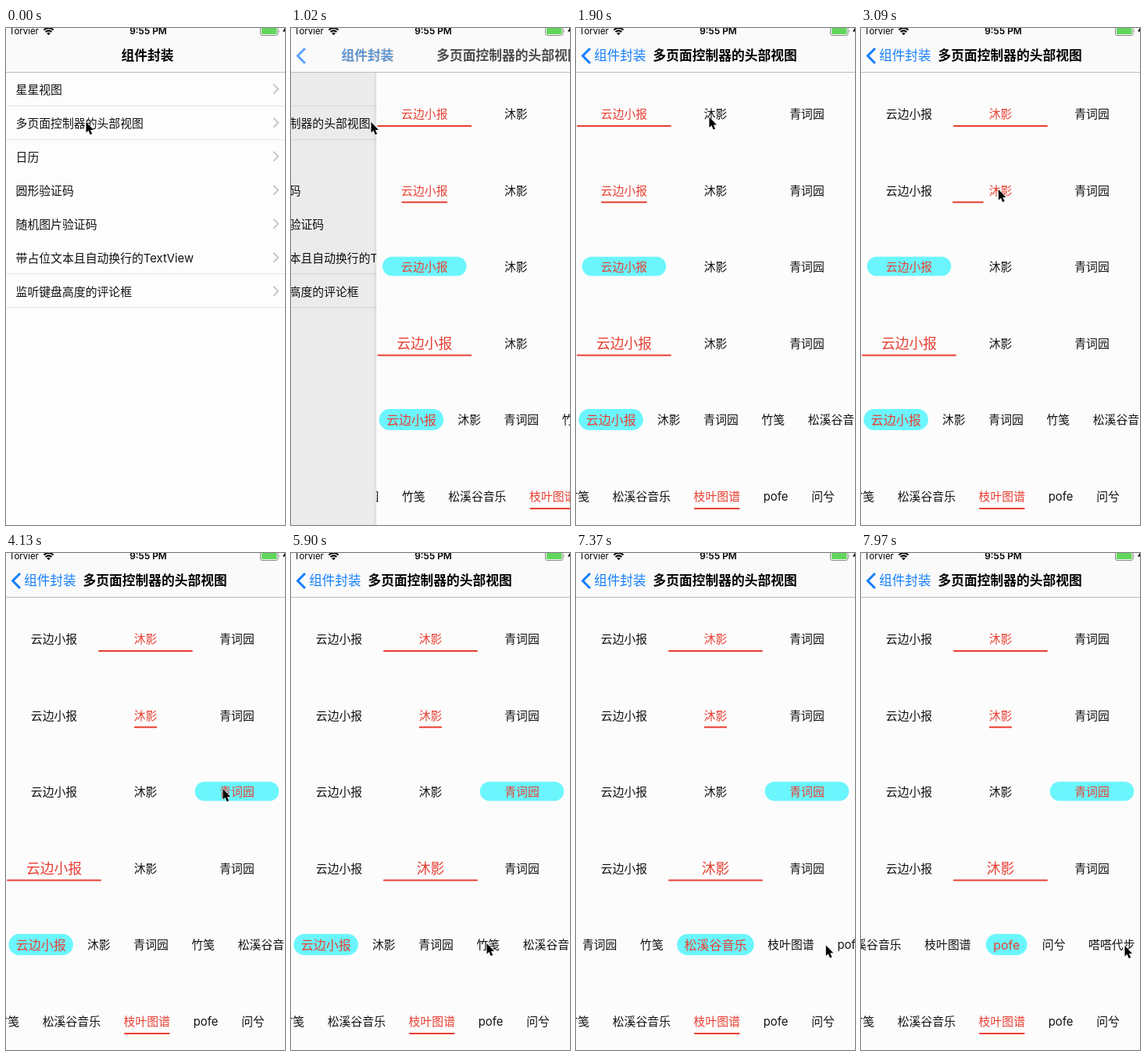
These frames come from a looping animation (357 by 634 pixels, 8000 ms). An HTML page:

```html
<!DOCTYPE html>
<html lang="zh-CN">
<head>
<meta charset="utf-8">
<title>组件封装</title>
<style>
html, body { margin: 0; width: 100%; height: 100%; overflow: hidden; background: #fdfdfd; }
svg { display: block; width: 100vw; height: 100vh; }
text { font: 14.85px Inter, "Noto Sans CJK SC", "Noto Sans CJK", sans-serif; fill: #111; white-space: pre; }
.mid { text-anchor: middle; }
.head { font-size: 16.75px; font-weight: 600; fill: #000; }
.back { font-size: 16.6px; fill: #147efb; }
.status { font-size: 11.4px; fill: #000; }
.clock { font-size: 11.9px; font-weight: 600; }
.on { fill: #e93f33; }
.bar { fill: #e93f33; }
.pill { fill: #6af6fc; }
.thin { fill: none; stroke: #c7c7cc; stroke-width: 2; }
.rule { stroke: #e6e6e8; }
</style>
</head>
<body>
<svg id="stage" viewBox="0 0 357 634">
  <defs>
    <linearGradient id="edge">
      <stop offset="0" stop-opacity="0"/>
      <stop offset="1" stop-opacity=".06"/>
    </linearGradient>
    <clipPath id="frame"><rect width="357" height="634"/></clipPath>
  </defs>
  <rect width="357" height="634" fill="#fdfdfd"/>
  <g id="list"></g>
  <rect id="dim" y="57" width="357" height="577"/>
  <g id="page">
    <rect x="-5" y="57" width="5" height="577" fill="url(#edge)"/>
    <rect y="57" width="357" height="577" fill="#fcfcfc"/>
  </g>
  <rect width="357" height="56" fill="#fafafa"/>
  <path d="M0 56.5H357" stroke="#bdbdbf"/>
  <path id="chevron" d="M18 26L8.6 35.5L18 45" fill="none" stroke="#147efb" stroke-width="3"/>
  <text id="oldTitle" class="head" y="41.2">组件封装</text>
  <text id="backTitle" class="back" y="41.2">组件封装</text>
  <text id="newTitle" class="head" y="41.2">多页面控制器的头部视图</text>
  <text class="status" x="4" y="8">Torvier</text>
  <g fill="none" stroke="#000" stroke-width="2">
    <path d="M48.4 2.6Q54.5 -2.8 60.6 2.6"/>
    <path d="M50.6 5.1Q54.5 1.7 58.4 5.1"/>
  </g>
  <path d="M52.2 6.6Q54.5 4.8 56.8 6.6L54.5 9.2Z"/>
  <text class="status clock mid" x="182" y="8.3">9:55 PM</text>
  <rect x="325.5" y="-1.5" width="22.5" height="11" rx="2.5" fill="none" stroke="#8a8a8a"/>
  <rect x="327" y="0" width="19.5" height="8" rx="1" fill="#62d65c"/>
  <path d="M349.3 2.2Q351 4 349.3 5.8Z" fill="#8a8a8a"/>
  <path d="M357.5 -1L354 4.6H357V9H358V-1Z"/>
  <path id="mouse" d="M0 0V13.6L3 10.8L5.2 16L7.7 15L5.4 9.9H9.5Z" stroke="#fff" stroke-width="1" paint-order="stroke"/>
</svg>
<script>
const LOOP = 8000, MID = 178.5, EM = 14.85;
const $ = id => document.getElementById(id);
const list = $('list'), page = $('page');

function add(parent, tag, attrs, label) {
  const el = document.createElementNS('http://www.w3.org/2000/svg', tag);
  set(el, attrs);
  if (label) el.textContent = label;
  parent.append(el);
  return el;
}
function set(el, attrs) {
  for (const k in attrs) el.setAttribute(k, attrs[k]);
}
const move = (el, x, y = 0, s = 1) => set(el, { transform: `translate(${x} ${y}) scale(${s})` });
const mix = (a, b, p) => a + (b - a) * p;
const part = (t, start, len) => Math.min(1, Math.max(0, (t - start) / len));
const ease = (t, start, len = 300) => {
  const u = part(t, start, len);
  return u * u * (3 - 2 * u);
};

// First screen
['星星视图', '多页面控制器的头部视图', '日历', '圆形验证码', '随机图片验证码',
  '带占位文本且自动换行的TextView', '监听键盘高度的评论框'].forEach((name, i) => {
  const y = 78 + 43 * i;
  add(list, 'text', { x: 12.6, y: y + 5.6 }, name);
  add(list, 'path', { class: 'thin', d: `M342.3 ${y - 6.3}l6 6l-6 6` });
});
for (const y of [99.5, 142.5, 313.5, 356.5]) add(list, 'path', { class: 'rule', d: `M0 ${y}H357` });

// Second screen
const names = ['云边小报', '沐影', '青词园', '竹笺', '松溪谷音乐', '枝叶图谱', 'pofe', '问兮', '嗒嗒代步'];
const cols = [61.5, MID, 295.5];
const widths = names.map(n => n === 'pofe' ? 32 : n.length * EM);
let edge = 15;
const centers = widths.map(w => {
  const c = edge + w / 2;
  edge += w + 29.6;
  return c;
});

function label(parent, name) {
  const g = add(parent, 'g', {});
  const text = add(g, 'text', { class: 'mid', y: 5.6 }, name);
  return { g, text };
}
const paint = (item, on) => item.text.classList.toggle('on', on);

// Three-column rows: y, marker height and widths, click time, chosen column, scale
const tabs = [
  { y: 109, mark: 125, h: 2, w: [121, 121], at: 1990, to: 1, big: 1 },
  { y: 207, mark: 222.2, h: 2, w: [59, 29.5], at: 2900, to: 1, big: 1 },
  { y: 304, mark: 304, h: 24.5, w: [107.5, 107.5], at: 3800, to: 2, big: 1 },
  { y: 402, mark: 417.5, h: 2, w: [121, 121], at: 4980, to: 1, big: 1.2 }
];
for (const r of tabs) {
  r.el = add(page, 'rect', { class: r.h > 9 ? 'pill' : 'bar', y: r.mark - r.h / 2, height: r.h, rx: r.h / 2 });
  r.items = cols.map((_, i) => label(page, names[i]));
}
function drawTab(r, t) {
  const p = ease(t, r.at), clicked = t >= r.at;
  const w = mix(r.w[0], r.w[1], p);
  set(r.el, { x: mix(cols[0], cols[r.to], p) - w / 2, width: w });
  r.items.forEach((item, i) => {
    const on = i === (clicked ? r.to : 0);
    paint(item, on);
    move(item.g, cols[i], r.y, on ? (clicked ? mix(1, r.big, p) : r.big) : 1);
  });
}

// Scrolling row with a pill behind the chosen label
const scroller = add(page, 'g', { 'clip-path': 'url(#frame)' });
const strip = add(scroller, 'g', {});
const stripItems = names.map(n => label(strip, n));
stripItems.forEach((item, i) => {
  const w = widths[i] + 17;
  item.pill = add(item.g, 'rect', { class: 'pill', x: -w / 2, y: -12.5, width: w, height: 25, rx: 12.5 });
  item.g.prepend(item.pill);
});
const clicks = [[6150, 3], [6773, 4], [7700, 6]];
function drawStrip(t) {
  let chosen = 0, scroll = 0, grow = 1;
  for (const [at, i] of clicks) {
    if (t < at) break;
    chosen = i;
    grow = ease(t, at);
    scroll = mix(scroll, centers[i] - MID, grow);
  }
  move(strip, -scroll);
  stripItems.forEach((item, i) => {
    const on = i === chosen;
    paint(item, on);
    set(item.pill, { visibility: on ? 'visible' : 'hidden' });
    move(item.g, centers[i], 499.5, on ? 1 + 0.08 * grow : 1);
  });
}

// Bottom row, scrolls once while the screen slides in
const foot = add(scroller, 'g', {});
names.forEach((n, i) => {
  const item = label(foot, n);
  paint(item, i === 5);
  move(item.g, centers[i], 597);
});
add(foot, 'rect', { class: 'bar', x: centers[5] - 29.3, y: 611.9, width: 58.6, height: 2, rx: 1 });

// Pointer stops: time, x, y
const stops = [[0, 102.5, 120], [1310, 102.5, 120], [1890, 170.5, 113.5], [2345, 170.5, 113.5],
  [2620, 176, 206], [3090, 176, 206], [3370, 268, 294], [3680, 268, 294], [3815, 277.5, 301],
  [4430, 277.5, 301], [4850, 180, 400], [5310, 180, 400], [5590, 222, 472], [5885, 250.5, 498],
  [6340, 250.5, 498], [6480, 266.5, 498.5], [7080, 266.5, 498.5], [7510, 337.5, 501], [LOOP, 337.5, 501]];
function drawMouse(t) {
  const i = stops.findIndex(s => s[0] > t);
  const a = stops[i - 1], b = stops[i];
  const p = ease(t, a[0], b[0] - a[0]);
  move($('mouse'), mix(a[1], b[1], p), mix(a[2], b[2], p));
}

function drawPush(t) {
  const left = (1 - part(t, 861, 450)) ** 3, p = 1 - left;
  const x = 24 + 124 * left ** 0.93;
  move(list, -107 * p);
  move(page, 363 * left - 6 * left * p ** 0.5);
  move(foot, -250 * ease(t, 793, 295));
  set($('dim'), { opacity: 0.1 * p });
  set($('oldTitle'), { x: x - 0.4, opacity: left });
  set($('backTitle'), { x: x - 0.8, opacity: p });
  set($('newTitle'), { x: 98.6 + 287 * left, opacity: p });
  set($('chevron'), { opacity: p });
}

// The screen refreshes in even ticks
const FIRST = 1008, TICK = 147.95;
const hold = t => t < FIRST ? 0 : FIRST + Math.floor((t - FIRST) / TICK) * TICK;

function draw(now) {
  const t = hold(now % LOOP);
  drawPush(t);
  for (const r of tabs) drawTab(r, t);
  drawStrip(t);
  drawMouse(t);
}
const start = performance.now();
function loop() {
  draw(performance.now() - start);
  requestAnimationFrame(loop);
}
loop();
</script>
</body>
</html>
```
